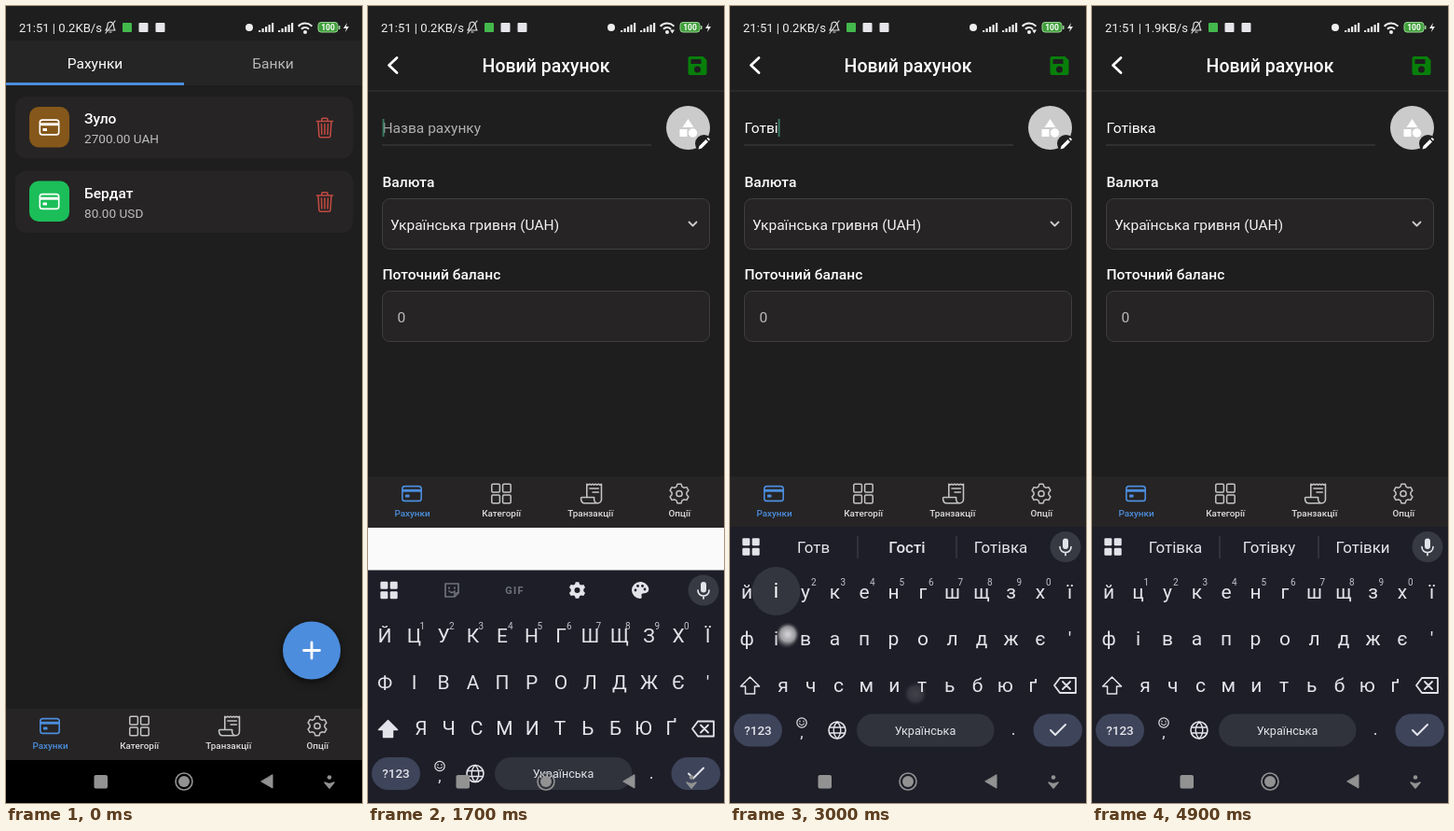
These frames come from a looping animation (382x854 px, 5000 ms). An HTML page with a canvas:

```html
<!DOCTYPE html>
<html lang="uk">
<head>
<meta charset="utf-8">
<style>
html, body { margin: 0; width: 100%; height: 100%; overflow: hidden; background: #1e1e1e; }
canvas { display: block; width: 382px; height: 854px; }
</style>
</head>
<body>
<canvas></canvas>
<script>
const LOOP = 5000, STEP = 100, W = 382, H = 854;
const BG = '#1e1e1e', PANEL = '#262424', BLUE = '#4c8ddd', KEYS = '#1d1e28', LIGHT = '#e3e4ea';
const canvas = document.querySelector('canvas'), c = canvas.getContext('2d');
const dpr = window.devicePixelRatio || 1;
canvas.width = W * dpr;
canvas.height = H * dpr;

const rows = ['йцукенгшщзхї', "фівапролджє'", 'ячсмитьбюґ'];
const keyX = (r, i) => r < 2 ? 18 + i * 31.5 : 57 + i * 29.8;

// time, typed text, suggestions
const typing = [
  [2700, 'Г', 'Г Го Готово'],
  [2800, 'Го', 'Го Год Голос'],
  [2900, 'Готв', 'Гот Готово Готель'],
  [3000, 'Готві', 'Готв Гості Готівка'],
  [3100, 'Готві', 'Готві Гості Готівка'],
  [3300, 'Готв', 'Готв Гості Готівка'],
  [3500, 'Гот', 'Гот Готово Готель'],
  [3700, 'Готі', 'Готі Готівка Готівку'],
  [3800, 'Готів', 'Готів Готівка Готівкові'],
  [4000, 'Готівк', 'Готівк Готівка Готівку'],
  [4200, 'Готівка', 'Готівка Готівку Готівки']
];

// time, x, y, key
const touches = [
  [100, 328, 692], [1500, 130, 132],
  [2600, 203, 630, 'г'], [2700, 206, 681, 'о'], [2800, 199, 737, 'т'],
  [2900, 61, 676, 'в'], [3000, 62, 673, 'і'],
  [3200, 358, 729], [3400, 358, 729],
  [3600, 60, 673, 'і'], [3700, 66, 671, 'в'], [3900, 107, 622, 'к'], [4100, 112, 675, 'а']
];

function box(x, y, w, h, r, fill, stroke, lw = 1) {
  c.beginPath();
  c.roundRect(x, y, w, h, r);
  paint(fill, stroke, lw);
}
function disc(x, y, r, fill, stroke, lw = 1) {
  c.beginPath();
  c.arc(x, y, r, 0, 7);
  paint(fill, stroke, lw);
}
function paint(fill, stroke, lw) {
  if (fill) { c.fillStyle = fill; c.fill('evenodd'); }
  if (stroke) { c.strokeStyle = stroke; c.lineWidth = lw; c.stroke(); }
}
function icon(d, x, y, fill, stroke, lw = 1.5) {
  c.save();
  c.translate(x, y);
  c.lineJoin = c.lineCap = 'round';
  const p = new Path2D(d);
  if (fill) { c.fillStyle = fill; c.fill(p, 'evenodd'); }
  if (stroke) { c.strokeStyle = stroke; c.lineWidth = lw; c.stroke(p); }
  c.restore();
}
// Outline drawn on a 512-unit grid
function outline(d, x, y, color) {
  c.save();
  c.translate(x, y);
  c.scale(0.049, 0.049);
  icon(d, -256, -256, null, color, 32);
  c.restore();
}
function text(s, x, y, size, color = '#fff', align = 'left', weight = 400) {
  c.font = `${weight} ${size}px Roboto, sans-serif`;
  c.textAlign = align;
  c.fillStyle = color;
  c.fillText(s, x, y);
}
function gear(x, y, r, hole, fill, stroke) {
  c.beginPath();
  c.lineJoin = 'round';
  for (let tooth = 0; tooth < 360; tooth += 60)
    for (const side of [-22, -11, 11, 22]) {
      const a = (tooth + side) * Math.PI / 180, d = Math.abs(side) < 20 ? r : r * 0.76;
      c.lineTo(x + d * Math.sin(a), y + d * Math.cos(a));
    }
  c.closePath();
  c.moveTo(x + hole, y);
  c.arc(x, y, hole, 0, 7);
  paint(fill, stroke, 1.5);
}
function grid(x, y, size, gap, fill, stroke) {
  for (const i of [0, 1]) for (const j of [0, 1])
    box(x + (i ? gap : -gap - size), y + (j ? gap : -gap - size), size, size, 1.2, fill, stroke, 1.5);
}
function card(x, y, color) {
  box(x - 10.2, y - 7.9, 20.4, 15.8, 2.7, null, color, 1.6);
  box(x - 10, y - 4.7, 20, 2.9, 0, color);
  box(x - 7, y + 1, 4.5, 2.9, 0.5, color);
}

function statusBar(t) {
  text(`21:51 | ${t < 3400 ? '0.2' : '1.9'}KB/s`, 14, 27.5, 13.1, '#eee');
  icon('M-5 4H5C3 2 4 -1 3 -3C1 -6 -3 -5 -3 -2C-3 1 -3 2 -5 4M-1 6H1M5 -6L-5 7', 112, 22, null, '#ddd', 1.2);
  box(125, 18, 10, 10, 1, '#43b84c');
  box(142.5, 18, 10, 10, 1, '#e6e6ea');
  box(160.5, 18, 10, 10, 1, '#e6e6ea');
  disc(261, 23, 4, '#eee');
  for (const x of [271, 292])
    for (let i = 0; i < 5; i++) box(x + i * 3.5, 26 - i * 2, 2.2, 2 + i * 2, 0.5, '#eee');
  disc(321, 28, 2, '#eee');
  for (const r of [5.5, 10]) {
    c.beginPath();
    c.arc(321, 28.5, r, -2.4, -0.74);
    paint(null, '#eee', 2);
  }
  if (t >= 1500 && t < 4500) icon('M-2.5 -2H2.5L0 2Z', 326.5, 27.5, '#eee');
  box(335, 17.5, 21, 10.5, 3, '#3f9f3a', '#9bd596');
  box(357, 21, 1.5, 4, 0.5, '#9bd596');
  text('100', 345.5, 26, 8.5, '#fff', 'center', 700);
  icon('M1 -5L-3 1H0L-1 5L3 -1H0Z', 365, 23, '#eee');
}

function account(y, name, sum, color) {
  box(10, y, 362.5, 66.5, 12, PANEL);
  box(25, y + 11, 43, 43.5, 10, color);
  card(46.5, y + 33, '#fff');
  text(name, 84, y + 29, 15.55, '#fff', 'left', 500);
  text(sum, 84, y + 50, 13.6, '#bdbdbd');
  outline('M112 112l20 320q4 32 32 32h184q28 0 32-32l20-320M80 112h352M192 112V72q0-24 24-24h80q24 0 24 24v40M256 176v224M184 176l8 224M328 176l-8 224', 342, y + 33.5, '#c04a42');
}

function accountsPage(t) {
  box(0, 0, W, 753, 0, BG);
  box(0, 37, W, 48, 0, '#252525');
  text('Рахунки', 95.5, 67, 15.55, '#fff', 'center');
  text('Банки', 286.5, 67, 15.55, '#b8b8b8', 'center');
  box(0, 82, 191, 3, 0, BLUE);
  account(97, 'Зуло', '2700.00 UAH', '#85571a');
  account(176.5, 'Бердат', '80.00 USD', '#1bbe59');
  c.save();
  c.shadowColor = '#0009';
  c.shadowBlur = 8 * dpr;
  c.shadowOffsetY = 3 * dpr;
  disc(328, 690.5, 31, BLUE);
  c.restore();
  if (t >= 100) disc(328, 690.5, Math.min(31, 12 + (t - 100) / 12), '#ffffff28');
  icon('M-8.5 0H8.5M0 -8.5V8.5', 328, 690.5, null, '#fff', 2.8);
}

function formPage(t, typed) {
  box(0, 0, W, 753, 0, BG);
  icon('M4.5 -8L-4 0L4.5 8', 26.5, 63.5, null, '#fff', 2.8);
  text('Новий рахунок', 191, 71, 19.44, '#fff', 'center', 500);
  icon('M-10 -8Q-10 -10 -8 -10H6L10 -6V8Q10 10 8 10H-8Q-10 10 -10 8ZM-7 -7V-2H4V-7ZM3.5 4A3.5 3.5 0 1 0 -3.5 4A3.5 3.5 0 1 0 3.5 4Z', 353.5, 64, '#087f0b');
  box(0, 90.5, W, 1, 0, '#373737');

  text(typed || 'Назва рахунку', 15.5, 135.5, 15.55, typed ? '#fff' : '#b0b0b0');
  const cursor = t >= 1500 && t < 2000 || t >= 2600 && t < 4700;
  if (cursor) box(15.5 + (typed ? c.measureText(typed).width : 0), 121, 2, 19, 0, '#38775f');
  box(15, 148.5, 289, 1, 0, '#454545');

  disc(343.5, 130.5, 23.5, '#cbcbcb');
  icon('M0 -10L6 -1H-6ZM-9 1H-1V9H-9Z', 343.5, 131, '#fff');
  disc(348.5, 136, 4.7, '#fff');
  disc(360.5, 147.5, 9.5, BG);
  icon('M-6 6L-5 2.5L2 -4.5L4.5 -2L-2.5 5ZM3 -5.5L4.5 -6.5L6.5 -4.5L5.5 -3Z', 360.5, 147.5, '#fff');

  text('Валюта', 15.5, 194, 15.55, '#fff', 'left', 500);
  box(15.5, 206.5, 351, 54, 8, PANEL, '#403e3e');
  text('Українська гривня (UAH)', 24, 239.5, 15.55, '#f2f2f2');
  icon('M-4 -2L0 2L4 -2', 348.5, 233.5, null, '#ccc', 1.8);
  text('Поточний баланс', 15.5, 293, 15.55, '#fff', 'left', 500);
  box(15.5, 305.5, 351, 54, 8, PANEL, '#403e3e');
  text('0', 31.5, 338.5, 15.55, '#bbb');
}

function tabBar(y) {
  const gray = '#c4c4c4';
  box(0, y, W, 55, 0, PANEL);
  card(47, y + 18.5, BLUE);
  grid(143, y + 18.5, 8.6, 1.6, null, gray);
  outline('M160 336V48l32 16 32-16 32 16 32-16 32 16 32-16 32 16 32-16 32 16 32-16v336a80 80 0 0 1-160 0v-48H48q-16 0-16 16c0 64 7 112 80 112h288M224 144h192M288 224h128', 239.5, y + 18.5, gray);
  gear(334, y + 18.5, 10.5, 3.1, null, gray);
  ['Рахунки', 'Категорії', 'Транзакції', 'Опції'].forEach((s, i) =>
    text(s, 47.5 + i * 95.6, y + 43, 9.9, i ? '#dedede' : BLUE, 'center', 500));
}

function toolbar() {
  const dim = '#6f717b';
  icon('M-7 -7H7V3L3 7H-7ZM7 3H3V7M-3 -3V-2M3 -3V-2M-3 1Q0 4 3 1', 90, 579.5, null, dim, 1.7);
  c.letterSpacing = '1.2px';
  text('GIF', 157.5, 583.5, 11, dim, 'center', 700);
  c.letterSpacing = '0px';
  gear(224.5, 579.5, 9, 3, LIGHT);
  icon('M0 -9A9 9 0 1 0 0 9C3 9 1 6 1.5 4.5C2 3 4 3.5 6 3C13 1 8 -9 0 -9Z', 292, 579.5, LIGHT);
  for (const [x, y] of [[-5, 0], [-2.5, -4.5], [2.5, -4.5], [5, -1]]) disc(292 + x, 579.5 + y, 1.4, KEYS);
}

function keyboard(dy, upper, words) {
  c.save();
  c.translate(0, dy);
  box(0, 558, W, 296, 0, KEYS);
  grid(22.5, 579.5, 8, 1.2, LIGHT);
  if (words) {
    words.split(' ').forEach((w, i) =>
      text(w, [89.5, 190, 290.5][i], 586, 16.9, LIGHT, 'center', w === 'Гості' ? 500 : 400));
    for (const x of [137, 243]) box(x - 0.5, 568, 1, 24, 0, '#454751');
  } else toolbar();
  disc(360, 579.5, 16.5, '#373943');
  box(357, 570.5, 6, 11.5, 3, LIGHT);
  icon('M-6 0C-6 8 6 8 6 0M0 6V9', 360, 579.5, null, LIGHT, 1.7);

  rows.forEach((row, r) => [...row].forEach((k, i) => {
    const x = keyX(r, i);
    text(upper ? k.toUpperCase() : k, x, 635.3 + r * 49.7, 21, LIGHT, 'center');
    if (!r && i && i < 11) text(i % 10, x + 8.8, 621, 10, '#c2c4cc', 'center');
  }));
  icon('M0 -9L10 1H5V9H-5V1H-10Z', 21.5, 728, upper && LIGHT, LIGHT, 1.5);
  icon('M-12 0L-6 -8H11V8H-6ZM-3 -4L5 4M5 -4L-3 4', 360, 728, null, LIGHT, 1.8);

  box(4, 758.5, 52, 35, 17.5, '#3e445a');
  text('?123', 30, 780.5, 13.5, LIGHT, 'center', 500);
  disc(77, 768, 5.2, null, LIGHT, 1.2);
  icon('M-2 -2V-1M2 -2V-1M-2.5 1Q0 4 2.5 1', 77, 768, null, LIGHT, 1.1);
  text(',', 77, 784, 17, LIGHT, 'center');
  disc(115, 776, 9, null, LIGHT, 1.6);
  icon('M-8 -3H8M-8 3H8M0 -9C-5 -4 -5 4 0 9C5 4 5 -4 0 -9', 115, 776, null, LIGHT, 1.4);
  box(136, 758.5, 147.5, 35, 17.5, '#30323c');
  text('Українська', 209.5, 780.5, 12.6, LIGHT, 'center');
  text('.', 304, 781, 18, LIGHT, 'center');
  box(325.5, 758.5, 52.5, 35, 17.5, '#3e445a');
  icon('M-8 0L-3 5L8 -6', 352, 776, null, LIGHT, 2);
  c.restore();
}

function navBar() {
  const gray = '#929292';
  box(94.5, 824, 14.5, 14.5, 2, gray);
  disc(191, 831, 9, null, gray, 1.6);
  disc(191, 831, 6, gray);
  icon('M6 -7V7L-6 0Z', 280, 831, gray, gray, 1);
  disc(347, 826.5, 2.3, gray);
  icon('M-5 0Q0 3 5 0L0 6Z', 347, 832, gray, gray, 1.5);
}

function drawTouch(t, [start, x, y, key]) {
  const age = t - start;
  if (age < 0 || age >= (key ? 300 : 200)) return;
  if (key && age < STEP) {
    const r = rows.findIndex(s => s.includes(key));
    const px = keyX(r, rows[r].indexOf(key)), py = 577 + r * 50;
    disc(px, py, 26, '#33363f');
    text(start < 2700 ? key.toUpperCase() : key, px, py + 7, 22, '#fff', 'center');
    if (key === 'к') for (const d of [-4, 0, 4]) disc(px + d, py + 19, 1.2, '#fff');
  }
  const fade = [0.85, 0.45, 0.18][age / STEP];
  const g = c.createRadialGradient(x, y, 1, x, y, 13);
  g.addColorStop(0, `rgba(225,225,228,${fade})`);
  g.addColorStop(0.6, `rgba(180,180,185,${fade * 0.85})`);
  g.addColorStop(1, 'rgba(60,60,60,0)');
  disc(x, y, 13, g);
}

function draw(t) {
  c.setTransform(dpr, 0, 0, dpr, 0, 0);
  const [, typed, words] = typing.findLast(s => t >= s[0]) || [0, '', ''];

  // The form rises 40px while fading in
  const shown = 1 - (1 - Math.min(1, Math.max(0, (t - 400) / 300))) ** 3;
  if (shown < 1) accountsPage(t);
  if (shown > 0) {
    c.save();
    c.globalAlpha = shown;
    c.translate(0, 40 * (1 - shown));
    formPage(t, typed);
    c.restore();
  }
  statusBar(t);

  if (t >= 1600) {
    box(0, 558, W, 296, 0, '#fafafa');
    tabBar(504);
    const slide = Math.min(1, (t - 1550) / 326);
    keyboard(Math.round(592 * (1 - slide) ** 3) / 2, t < 2700, words);
  } else {
    tabBar(753);
    box(0, 808, W, 46, 0, '#000');
  }
  navBar();
  for (const touch of touches) drawTouch(t, touch);
}

const began = performance.now();
function tick() {
  const t = (performance.now() - began) % LOOP;
  draw(Math.floor(t / STEP) * STEP);
  requestAnimationFrame(tick);
}
tick();
</script>
</body>
</html>
```
